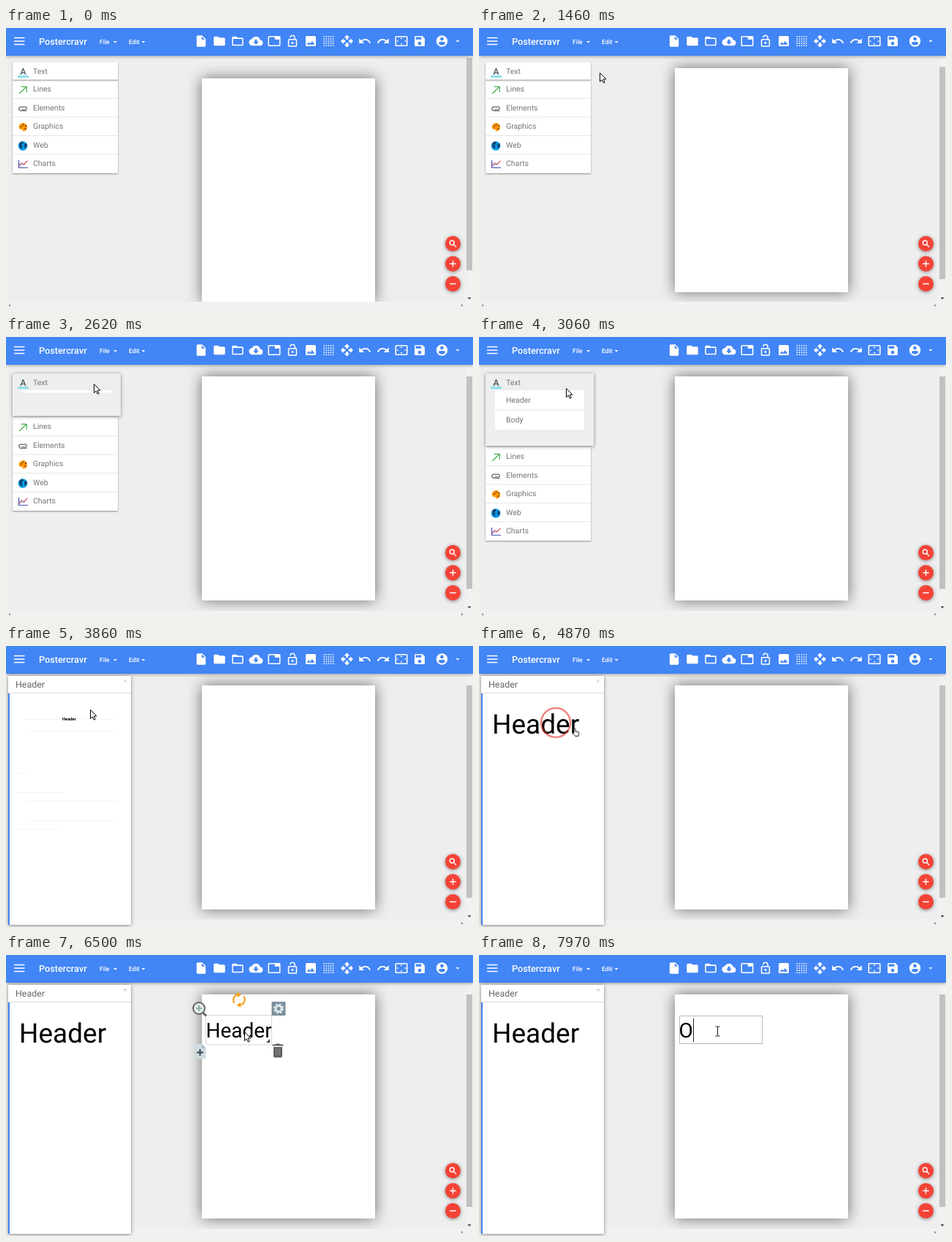
Animation of 639 by 385 pixels, one loop 8000 ms. Source, as an HTML page:

```html
<!DOCTYPE html>
<html lang="en">
<head>
<meta charset="utf-8">
<title>Page editor</title>
<style>
  html, body { margin: 0; width: 100%; height: 100%; overflow: hidden; background: #eee; }
  svg#stage { display: block; width: 639px; height: 385px; }
  text { font-family: Roboto, Arial, sans-serif; text-rendering: geometricPrecision; white-space: pre; }
  .bar { filter: drop-shadow(0 1px 2px rgba(0,0,0,.35)); }
  .sheet { filter: drop-shadow(0 0 10px rgba(0,0,0,.55)); }
  .card { filter: drop-shadow(0 1px 1px rgba(0,0,0,.4)); }
  .raised { filter: drop-shadow(0 1px 2.5px rgba(0,0,0,.45)); }
  .label { font-size: 10.5px; fill: #757575; }
  .menu { font-size: 8.6px; font-weight: 500; fill: #fff; }
  .icon { fill: #fff; fill-rule: evenodd; }
  .line { fill: none; stroke-linecap: round; stroke-linejoin: round; }
  .big { fill: #000; }
</style>
</head>
<body>
<svg id="stage" viewBox="0 0 639 385">
  <defs>
    <clipPath id="view"><rect y="38" width="629" height="337"/></clipPath>
  </defs>
  <rect width="639" height="385" fill="#eee"/>

  <g clip-path="url(#view)">
    <rect id="page" class="sheet" x="268" y="69" width="237" height="307" fill="#fff"/>
  </g>

  <!-- scrollbars -->
  <path d="M629 38h10v347H0v-10h629z" fill="#f1f1f1"/>
  <rect id="thumb" x="630" y="41" width="8" height="291" fill="#c1c1c1"/>
  <path d="M631.5 369h5l-2.500 3z" fill="#505050"/>
  <path d="M6 378v4l-2.500-2zM623 378v4l2.500-2z" fill="#8a8a8a"/>

  <!-- side menu -->
  <g id="side">
    <g id="rest">
      <path class="card" d="M9 71h144v128H9z" fill="#fff"/>
      <path d="M9 96.500h144M9 122h144M9 147.500h144M9 173h144" stroke="#e6e6e6"/>
      <g class="label">
        <text x="37" y="87">Lines</text>
        <text x="37" y="112.500">Elements</text>
        <text x="37" y="138">Graphics</text>
        <text x="37" y="163.500">Web</text>
        <text x="37" y="189">Charts</text>
      </g>
      <path class="line" d="M18.500 89.500L28 80.500M21 80.300h7.200v7" stroke="#4caf50" stroke-width="1.300"/>
      <path class="line" d="M28 113.500h-7.500a2.700 2.700 0 0 1 0-5.400h6.500a2 2 0 0 1 0 3.800h-5.500" stroke="#666" stroke-width="1.200"/>
      <path d="M17.500 136a5.800 5.800 0 1 1 7 5.600c-2 .3-1-2.400-2.800-2.600s-3.600.4-4.200-3z" fill="#ff9800"/>
      <path d="M20 134h2v2h-2zM22.500 131.500h2v2h-2zM26 133h2v2h-2zM25.500 137h2v2h-2z" fill="#8d4a17"/>
      <circle cx="23" cy="161.500" r="6.300" fill="#039be5"/>
      <path d="M18 158l3-2.500 3 1-1 2.500-2 1 1.500 2-1 4-3-3zM25 159l3-1 1 3-2 4-2-2z" fill="#0d4778"/>
      <path class="line" d="M17.500 181.500v10h12" stroke="#3f51b5" stroke-width="1.200"/>
      <path class="line" d="M18 189l3.500-4 3 2.200 4.500-5" stroke="#e5475a" stroke-width="1.200"/>
      <path class="line" d="M18.500 186l3 2.500 3.500-3.500" stroke="#64b5f6"/>
    </g>
    <path id="closed" d="M9 47h144v24H9z" fill="#fff" class="card"/>
    <path id="rule" d="M9 70.500h144" stroke="#e6e6e6"/>
    <rect id="open" class="raised" x="9" y="50" width="148" height="58" fill="#eee"/>
    <g id="head">
      <path d="M16 65.300h15v2.700H16z" fill="#80deea"/>
      <text x="23.500" y="63.500" text-anchor="middle" font-size="12.500" font-weight="500" fill="#455a64">A</text>
      <text class="label" x="37" y="62.500">Text</text>
    </g>
    <svg id="sub" x="22" y="73" width="122" height="0">
      <path d="M0 0h122v54H0z" fill="#fff"/>
      <path d="M0 27h122" stroke="#e6e6e6"/>
      <text class="label" x="15" y="17">Header</text>
      <text class="label" x="15" y="44">Body</text>
    </svg>
  </g>

  <!-- toolbar -->
  <path class="bar" d="M0 0h639v38H0z" fill="#4285f4"/>
  <path d="M11 13.500h14.500M11 18h14.500M11 22.500h14.500" stroke="#fff" stroke-width="1.600"/>
  <text x="45" y="23.300" font-size="12.700" font-weight="500" fill="#fff">Postercravr</text>
  <text class="menu" x="128" y="22">File</text>
  <text class="menu" x="168" y="22">Edit</text>
  <path d="M147 18h5l-2.500 2.600zM185.500 18h5l-2.500 2.600zM615.500 17h5l-2.500 2.600z" fill="#fff"/>
  <g id="tools"></g>

  <!-- round buttons -->
  <g class="raised" fill="#f44336">
    <circle cx="611.500" cy="295.500" r="10.500"/>
    <circle cx="611.500" cy="323" r="10.500"/>
    <circle cx="611.500" cy="350.500" r="10.500"/>
  </g>
  <g class="line" stroke="#fff" stroke-width="1.400">
    <circle cx="610.300" cy="294.300" r="3"/>
    <path d="M612.700 296.700l3 3M607.800 323h7.400M611.500 319.300v7.400M607.800 350.500h7.400"/>
  </g>

  <!-- slide-in panel -->
  <g id="panel">
    <path class="raised" d="M3 41h168v341H3z" fill="#fff"/>
    <path d="M3 64.500h168" stroke="#ddd"/>
    <path d="M3 65h2v317H3z" fill="#4285f4"/>
    <text x="13" y="56.500" font-size="12.400" fill="#666">Header</text>
    <path d="M161.500 46l3.500 3.500M165 46l-3.500 3.500" stroke="#bbb" stroke-width=".9"/>
    <g id="small">
      <path d="M24 100.500h48M106 100.500h44M28 116.500h124M15 174.500h15M15 200.500h65M28 212.500h124M28 239.500h124M15 251.500h55" stroke="#f4f4f4"/>
      <text x="77" y="102" font-size="5.800" font-weight="700">Header</text>
    </g>
    <text id="large" class="big" x="18" y="120" font-size="37">Header</text>
  </g>

  <!-- header on the page -->
  <rect id="mark" x="274" y="87" width="90" height="33" fill="#b5d5fd"/>
  <text id="word" class="big" x="273.500" y="113" font-size="28"></text>
  <rect id="edit" x="274.500" y="83.500" width="90" height="38" fill="none" stroke="#bbb"/>
  <path id="caret" d="M293.500 87v32" stroke="#222"/>
  <g id="controls">
    <rect x="273.500" y="82.500" width="90" height="40.500" fill="none" stroke="#aaa" stroke-dasharray="1 1"/>
    <path d="M361 115v5h-5z" fill="#444"/>
    <circle cx="264" cy="73" r="8" fill="#e4e9e8" stroke="#666" stroke-width="2"/>
    <path d="M269.500 79l4.500 4.500" stroke="#666" stroke-width="3"/>
    <path d="M260 73h8M264 69v8" stroke="#80b0a3" stroke-width="2"/>
    <g class="line" stroke="#f9a11b" stroke-width="2.200">
      <path d="M312 65a7.500 7.500 0 0 1 6-11M325.500 57a7.500 7.500 0 0 1-6 11.500"/>
    </g>
    <path d="M316.500 50.500l5.500 4-5.500 3.500zM321 65l-5.500 3.500 5.500 3.500z" fill="#f9a11b"/>
    <rect x="363.500" y="64" width="19" height="19" rx="1" fill="#78909c"/>
    <circle cx="373" cy="73.500" r="4" fill="none" stroke="#dfe6ea" stroke-width="3"/>
    <circle cx="373" cy="73.500" r="6.200" fill="none" stroke="#dfe6ea" stroke-width="2" stroke-dasharray="2.600 2.270"/>
    <path d="M259 122h9l5.500 5.500V142H259z" fill="#cfdbe0"/>
    <path d="M268 122v5.500h5.500z" fill="#a9bcc4"/>
    <path d="M261 133.500h9M265.500 129v9" stroke="#37474f" stroke-width="2"/>
    <path d="M366 126h12v12.500a2 2 0 0 1-2 2h-8a2 2 0 0 1-2-2zM364.500 122.500h4l1-1h5l1 1h4v2h-15z" fill="#616161"/>
    <path d="M369.500 128.500v9M372 128.500v9M374.500 128.500v9" stroke="#8d8d8d"/>
  </g>

  <text id="ghost" class="big" font-size="37" opacity=".6">Header</text>
  <circle id="ring" r="20" fill="none" stroke="#e53935" stroke-opacity=".62" stroke-width="2.500"/>

  <g id="cursor">
    <path id="arrow" d="M.5.500v12l2.800-2.600 2 4.300 1.900-.9-2-4.200h3.700z" fill="#fff" stroke="#000"/>
    <path id="hand" d="M2 1q1.500-1 2 .6V5l4 .8q1 .3.900 1.500L8 11.500H3.500L.3 7.500q0-1.300 1.700-.5z" fill="#fff" stroke="#222"/>
    <path id="beam" d="M-3-6.500h2.200q.8 0 .8 1v11q0 1-.8 1H-3M3-6.500H.8q-.8 0-.8 1v11q0 1 .8 1H3" fill="none" stroke="#111"/>
  </g>
</svg>
<script>
const LOOP = 8000;
const $ = id => document.getElementById(id);

// centre x and shape on a 24-unit grid
const tools = [
  [267, "M6 2a2 2 0 0 0-2 2v16a2 2 0 0 0 2 2h12a2 2 0 0 0 2-2V8l-6-6zM13 9V3.500L18.500 9z"],
  [292, "M10 4H4a2 2 0 0 0-2 2v12a2 2 0 0 0 2 2h16a2 2 0 0 0 2-2V8a2 2 0 0 0-2-2h-8z"],
  [317, "M10 4H4a2 2 0 0 0-2 2v12a2 2 0 0 0 2 2h16a2 2 0 0 0 2-2V8a2 2 0 0 0-2-2h-8zM4 8h16v10H4z"],
  [342, "M19.350 10A7.500 7.500 0 0 0 5.350 8 6 6 0 0 0 6 20h13a5 5 0 0 0 .35-10zM17 13l-5 5-5-5h3V9h4v4z"],
  [367, "M3 3a2 2 0 0 0-2 2v14a2 2 0 0 0 2 2h18a2 2 0 0 0 2-2V5a2 2 0 0 0-2-2zM3 5h10v4h8v10H3z"],
  [392, "M18 8h-1V6A5 5 0 0 0 7 6h1.900a3.100 3.100 0 0 1 6.200 0v2H6a2 2 0 0 0-2 2v10a2 2 0 0 0 2 2h12a2 2 0 0 0 2-2V10a2 2 0 0 0-2-2zM6 10h12v10H6zM10 15a2 2 0 0 0 4 0 2 2 0 0 0-4 0z"],
  [417, "M5 3a2 2 0 0 0-2 2v14a2 2 0 0 0 2 2h14a2 2 0 0 0 2-2V5a2 2 0 0 0-2-2zM8.500 13.500l2.500 3 3.500-4.500 4.500 6H5z"],
  [441.5, [3, 7, 11, 15, 19].map(y => [3, 7, 11, 15, 19].map(x => `M${x} ${y}h2v2h-2z`).join("")).join("")],
  [466.5, "M10 9h4V6h3l-5-5-5 5h3zM9 10H6V7l-5 5 5 5v-3h3zM23 12l-5-5v3h-3v4h3v3zM14 15h-4v3H7l5 5 5-5h-3z"],
  [491, "M12.500 8a10.500 10.500 0 0 0-6.900 2.600L2 7v9h9l-3.600-3.600a8 8 0 0 1 12.700 3.600l2.400-.8A10.500 10.500 0 0 0 12.500 8z"],
  [516, "M11.500 8a10.500 10.500 0 0 1 6.900 2.600L22 7v9h-9l3.600-3.600A8 8 0 0 0 3.900 16l-2.400-.8A10.500 10.500 0 0 1 11.500 8z"],
  [541, "M3 3a2 2 0 0 0-2 2v14a2 2 0 0 0 2 2h18a2 2 0 0 0 2-2V5a2 2 0 0 0-2-2zM3 5h18v14H3zM12 5.500L10 8h4zM18 10v4l2.500-2zM6 10l-2.500 2L6 14zM14 16h-4l2 2.500z"],
  [566, "M5 3a2 2 0 0 0-2 2v14a2 2 0 0 0 2 2h14a2 2 0 0 0 2-2V7l-4-4zM5 5h10v4H5zM9 16a3 3 0 0 0 6 0 3 3 0 0 0-6 0z"],
  [596.5, "M2 12a10 10 0 0 0 20 0 10 10 0 0 0-20 0zM9 8a3 3 0 0 0 6 0 3 3 0 0 0-6 0zM6 16c0-4 12-4 12 0a7.200 7.200 0 0 1-12 0z"]
];
$("tools").innerHTML = tools.map(([x, d]) =>
  `<path class="icon" transform="translate(${x - 9.3} 8.700) scale(.775)" d="${d}"/>`).join("");

// each row: start time, then the values held until the next row
const pageTop = [[0, 69], [1160, 66], [1310, 59], [1460, 55], [1600, 54]];
const growth = [[0, 0], [2340, 4], [2480, 18], [2620, 39], [2760, 60], [2900, 74], [3040, 80]];
const pointer = [
  [0, 0, 0, ""],
  [1160, 262, 75, "arrow"], [1310, 210, 66, "arrow"], [1460, 165, 61, "arrow"], [1600, 146, 60, "arrow"],
  [1740, 133, 61, "arrow"], [1880, 125, 63, "arrow"], [2020, 121, 64, "arrow"], [2160, 120, 64, "arrow"],
  [3040, 119, 70, "arrow"], [3240, 117, 80, "arrow"], [3380, 115, 87, "arrow"],
  [4000, 113, 91, "arrow"], [4140, 109, 97, "hand"], [4280, 106, 101, "hand"], [4500, 104, 102, "hand"],
  [4870, 128, 112, "hand"], [5010, 185, 116, "hand"], [5150, 270, 116, "hand"], [5290, 345, 115, "hand"],
  [5450, 388, 114, "arrow"], [5950, 365, 110, "arrow"], [6090, 345, 106, "arrow"], [6220, 332, 104, "arrow"],
  [6500, 326, 105, "arrow"], [7150, 326.5, 104.5, "beam"]
];
const word = [[0, ""], [5450, "Header"], [7970, "O"]];

const at = (track, t) => track.findLast(row => row[0] <= t).slice(1);
const show = (id, on) => { $(id).style.display = on ? "" : "none"; };
const set = (id, name, value) => $(id).setAttribute(name, value);

function draw(t) {
  const [top] = at(pageTop, t);
  set("page", "y", top);
  set("thumb", "y", 41 + (69 - top) * 0.87);

  const [grow] = at(growth, t);
  show("side", t < 3730);
  show("closed", !grow);
  show("rule", !grow);
  show("open", grow);
  set("open", "height", grow + 19);
  set("rest", "transform", `translate(0 ${grow})`);
  set("head", "transform", `translate(0 ${grow ? 3 : 0})`);
  set("sub", "height", Math.max(0, (grow - 36.5) * 1.25));

  show("panel", t >= 3730);
  show("small", t >= 3860 && t < 4000);
  show("large", t >= 4000);

  const typed = t >= 7970;
  const editing = t >= 7150;
  $("word").textContent = at(word, t)[0];
  show("controls", t >= 6090 && t < 7010);
  show("mark", editing && !typed);
  show("edit", editing);
  set("edit", "width", typed ? 113 : 90);
  show("caret", typed);

  const [x, y, kind] = at(pointer, t);
  set("cursor", "transform", `translate(${x} ${y})`);
  for (const id of ["arrow", "hand", "beam"]) show(id, id === kind);

  const press = t >= 4870 && t < 5010;
  show("ring", press || (t >= 6850 && t < 7010));
  set("ring", "cx", press ? 105 : 327);
  set("ring", "cy", 105);
  show("ghost", t >= 5010 && t < 5450);
  set("ghost", "x", x - 86);
  set("ghost", "y", y + 15);
}

function tick() {
  draw(performance.now() % LOOP);
  requestAnimationFrame(tick);
}
tick();
</script>
</body>
</html>
```
